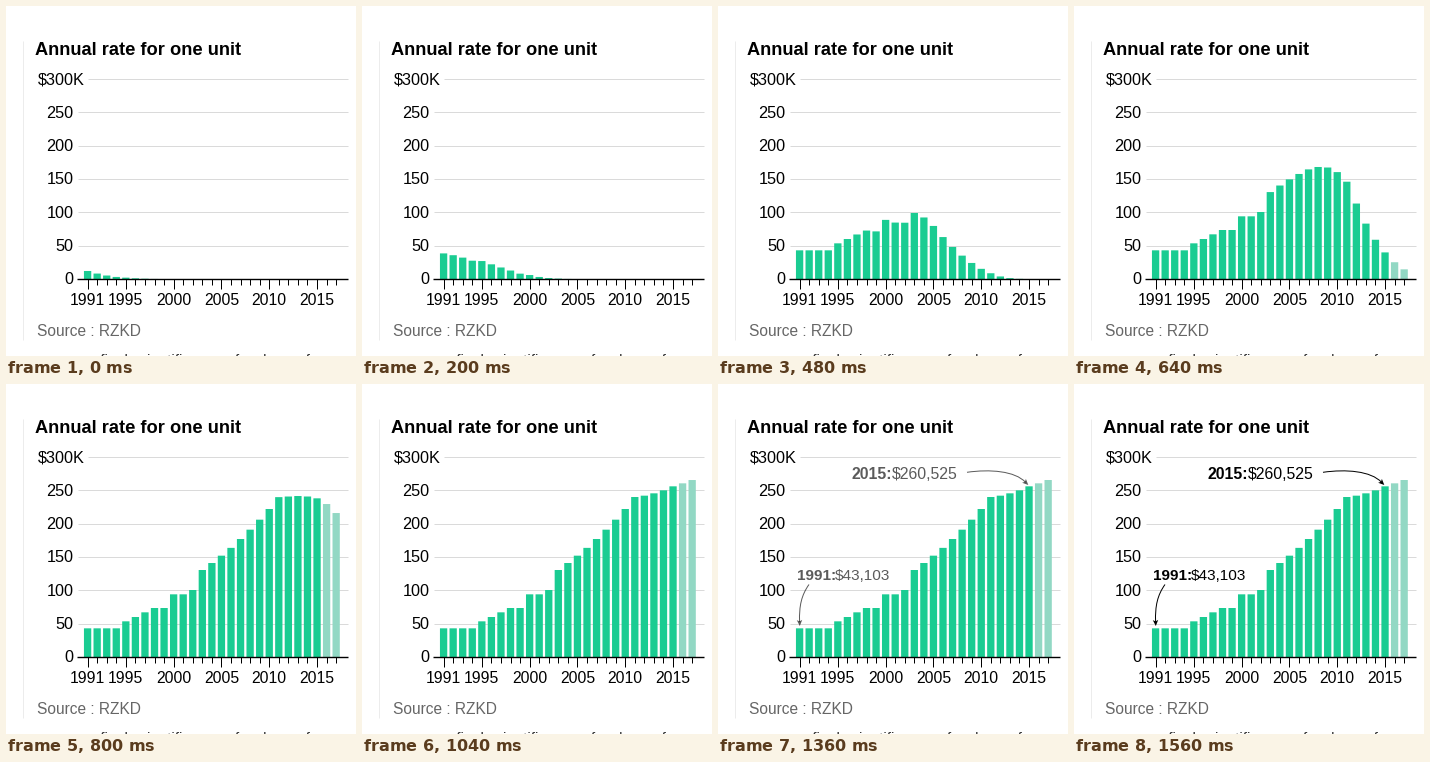
A matplotlib script for the animation above (1.68 s loop, 350 px wide and 350 px high).

```python
import numpy as np
import matplotlib.pyplot as plt
from matplotlib.animation import FuncAnimation
from matplotlib.patches import PathPatch, Polygon, Rectangle
from matplotlib.path import Path

SIZE, DPI = 350, 100
FRAMES, INTERVAL = 42, 40
PT = 72 / DPI  # points per pixel

GREEN, PALE = "#1acc92", "#92d8c4"
BASE, SCALE = 273, 200 / 300
FIRST_X, STEP, BAR_W = 81.6, 9.56, 7.3

RATES = [43, 43, 43, 43, 53.5, 60, 67, 73.5, 73.5, 94, 94, 100.5, 130.5, 141,
         152, 163.7, 177, 191, 206, 222, 240, 242, 245.5, 250, 256, 260.5, 265.5]
STAGGER = 0.05
# Progress of the first bar over time (ms); each later bar lags by STAGGER.
CLOCK_MS = [0, 320, 480, 640, 800, 960, 1080]
CLOCK = [0.412, 0.8745, 1.208, 1.539, 1.94, 2.2, 2.3]
FADE_START, FADE_MS = 1120, 440

plt.rcParams["font.family"] = "Liberation Sans"
fig = plt.figure(figsize=(SIZE / DPI, SIZE / DPI), dpi=DPI, facecolor="white")
ax = fig.add_axes([0, 0, 1, 1])
ax.set_xlim(0, SIZE)
ax.set_ylim(SIZE, 0)
ax.axis("off")


def line(x0, y0, x1, y1, color, width=1, z=1):
    ax.plot([x0, x1], [y0, y1], color=color, lw=width * PT, zorder=z,
            solid_capstyle="butt")


def label(x, y, text, px, color="black", ha="left", bold=False):
    return ax.text(x, y, text, fontsize=px * PT, color=color, ha=ha,
                   va="baseline", weight="bold" if bold else "normal", zorder=5)


def year_x(year):
    return FIRST_X + (year - 1991) * STEP


def arrow(start, c1, c2, tip, heading):
    """Curved thin line with a small notched head pointing along heading."""
    codes = [Path.MOVETO] + [Path.CURVE4] * 3
    d = np.array(heading) / np.hypot(*heading)
    n = np.array([-d[1], d[0]])
    tip = np.array(tip)
    curve = PathPatch(Path([start, c1, c2, tip - 4 * d], codes), fill=False,
                      lw=PT, ec="black", zorder=5)
    head = Polygon([tip, tip - 6 * d + 2.7 * n, tip - 4.6 * d,
                    tip - 6 * d - 2.7 * n], fc="black", lw=0, zorder=5)
    return [ax.add_patch(curve), ax.add_patch(head)]


def ease(t):
    t = np.clip(t, 0, 1)
    return np.where(t < 0.5, 4 * t**3, 1 - 4 * (1 - t) ** 3)


# Frame, title and value axis
line(16.5, 35, 16.5, 334, "#ececec")
label(29, 49, "Annual rate for one unit", 18.3, bold=True)
for value in range(0, 301, 50):
    y = BASE - value * SCALE
    top = value == 300
    if value:
        line(82 if top else 72, y, 342, y, "#dadada")
    label(78.5 if top else 67.5, y + 5.2, "$300K" if top else str(value),
          16.3, ha="right")

# Year axis
line(71, BASE, 342, BASE, "black", 1.4, z=4)
for year in range(1991, 2018):
    major = year == 1991 or year % 5 == 0
    x = year_x(year)
    line(x, BASE, x, BASE + (10 if major else 6), "black", z=4)
    if major:
        label(x, 299.3, str(year), 15.8, ha="center")

label(31, 330, "Source : RZKD", 15.5, "#666666")
label(62, 358.8, "as a final scientific sum of a share of one", 15, "#333333")

bars = []
for i in range(len(RATES)):
    bar = Rectangle((year_x(1991 + i) - BAR_W / 2, BASE), BAR_W, 0, lw=0,
                    fc=PALE if i > 24 else GREEN, zorder=3, snap=False)
    bars.append(ax.add_patch(bar))

notes = [
    label(134, 95.2, "2015:", 15.9, bold=True),
    label(174, 95.2, "$260,525", 15.9),
    label(78.5, 196.3, "1991:", 15.2, bold=True),
    label(116.5, 196.3, "$43,103", 15.4),
    *arrow((249, 88.3), (272, 85), (297, 87), (310.3, 101), (0.72, 0.7)),
    *arrow((91, 200.5), (83.5, 211), (81, 222), (81.8, 242), (0.05, 1)),
]


def draw(frame):
    ms = frame * INTERVAL
    lead = np.interp(ms, CLOCK_MS, CLOCK)
    grown = ease(lead - STAGGER * np.arange(len(RATES)))
    for bar, rate, part in zip(bars, RATES, grown):
        bar.set_height(-rate * SCALE * part)
    fade = np.clip((ms - FADE_START) / FADE_MS, 0, 1)
    for note in notes:
        note.set_alpha(1 - (1 - fade) ** 1.3)
    return bars + notes


anim = FuncAnimation(fig, draw, frames=FRAMES, interval=INTERVAL,
                     repeat=True, repeat_delay=0, blit=False)
plt.show()
```
